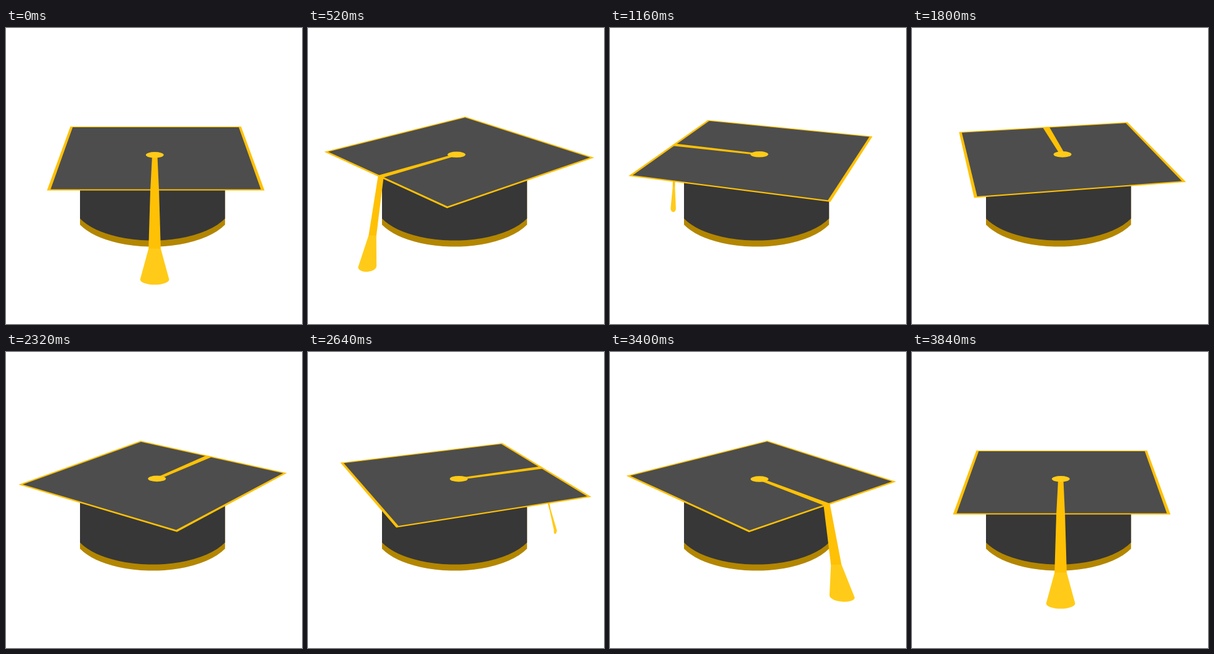
Animation of 480x480 px, one loop 3880 ms. Source, as an HTML page with a canvas:

```html
<!DOCTYPE html>
<html lang="en">
<head>
<meta charset="utf-8">
<title>Graduation cap</title>
<style>
  html, body { margin: 0; width: 100%; height: 100%; overflow: hidden; background: #fff; }
  canvas { display: block; width: 480px; height: 480px; }
</style>
</head>
<body>
<canvas id="stage" width="480" height="480"></canvas>
<script>
const ctx = document.getElementById('stage').getContext('2d');
const { sin, cos, abs, max, PI } = Math;
const LOOP = 3880, STEP = 40, TURN = LOOP - STEP;
const GOLD = '#ffc105', TASSEL = '#ffcb18', BOARD = '#4d4d4d', CAP = '#373737', BAND = '#b38600';

// Perspective view of the board plane; u points right, v towards the viewer.
function project(u, v) {
  const s = 1 / (1 - 0.12 * v);
  return [242.8 + 154 * u * s, 423 * s - 217.6];
}

// Board coordinates: side runs ahead of the turn, out runs towards the tassel.
function place(angle, side, out) {
  return project(-out * sin(angle) - side * cos(angle), out * cos(angle) - side * sin(angle));
}

function fillPoly(points, color) {
  ctx.beginPath();
  points.forEach(p => ctx.lineTo(...p));
  ctx.closePath();
  ctx.fillStyle = color;
  ctx.fill();
}

// Body of the cap, closed below by a slice of an ellipse.
function drawBody(y, dip, color) {
  const half = 117.6, rx = 130, a = Math.asin(half / rx), ry = dip / (1 - cos(a));
  ctx.beginPath();
  ctx.moveTo(237.6 - half, 215);
  ctx.lineTo(237.6 + half, 215);
  ctx.ellipse(237.6, y + dip - ry, rx, ry, 0, PI / 2 - a, PI / 2 + a);
  ctx.closePath();
  ctx.fillStyle = color;
  ctx.fill();
}

function drawCap() {
  drawBody(319, 35.6, BAND);
  drawBody(309, 35.6, CAP);
}

function drawBoard(angle) {
  const square = h => [[-h, -h], [h, -h], [h, h], [-h, h]].map(([a, b]) => place(angle, a, b));
  fillPoly(square(1.007), GOLD);
  fillPoly(square(0.977), BOARD);
  fillPoly([place(angle, -0.017, 0), place(angle, 0.037, 0),
            place(angle, 0.05, 1), place(angle, -0.03, 1)], GOLD);
  const [x, y] = place(angle, 0.01, 0.008);
  ctx.beginPath();
  ctx.ellipse(x, y, 14.5, 4.8, 0, 0, 2 * PI);
  ctx.fillStyle = TASSEL;
  ctx.fill();
}

// The cord swings outwards as it turns and narrows when seen edge-on.
function drawTassel(angle) {
  const c = cos(angle), s = sin(angle);
  const [x, y] = place(angle, 0.01, 0.985);
  const dx = -20.4 * s - 9.56 * sin(2 * angle) + 8.35 * (1 - c);
  const dy = 114.5 + 59.3 * c - 2 * s - 19.6 * cos(2 * angle);
  const top = max(2.5, 14 * abs(c)) / 2;
  const end = max(5, abs(8.8 + 38.2 * c - 5.35 * s)) / 2;
  const knot = end * 0.42;
  const kx = x + dx * 0.62, ky = y + dy * 0.62;
  const bx = x + dx, by = y + dy * 0.945;
  const tilt = 0.6 * Math.atan2(dx, dy);

  fillPoly([[x - top, y], [x + top, y], [kx + knot, ky + 0.5], [kx - knot, ky + 0.5]], GOLD);
  ctx.beginPath();
  ctx.moveTo(kx - knot, ky);
  ctx.lineTo(kx + knot, ky);
  ctx.ellipse(bx, by, end, dy * 0.055, tilt, 0, PI);
  ctx.closePath();
  ctx.fillStyle = TASSEL;
  ctx.fill();
}

function draw(ms) {
  const t = Math.floor(((ms + 1) % LOOP) / STEP) * STEP;
  const angle = 2 * PI * t / TURN;
  const inFront = cos(angle) > 0.12;
  ctx.fillStyle = '#fff';
  ctx.fillRect(0, 0, 480, 480);
  if (!inFront) drawTassel(angle);
  drawCap();
  drawBoard(angle);
  if (inFront) drawTassel(angle);
}

const start = performance.now();
function tick() {
  draw(performance.now() - start);
  requestAnimationFrame(tick);
}
tick();
</script>
</body>
</html>
```
